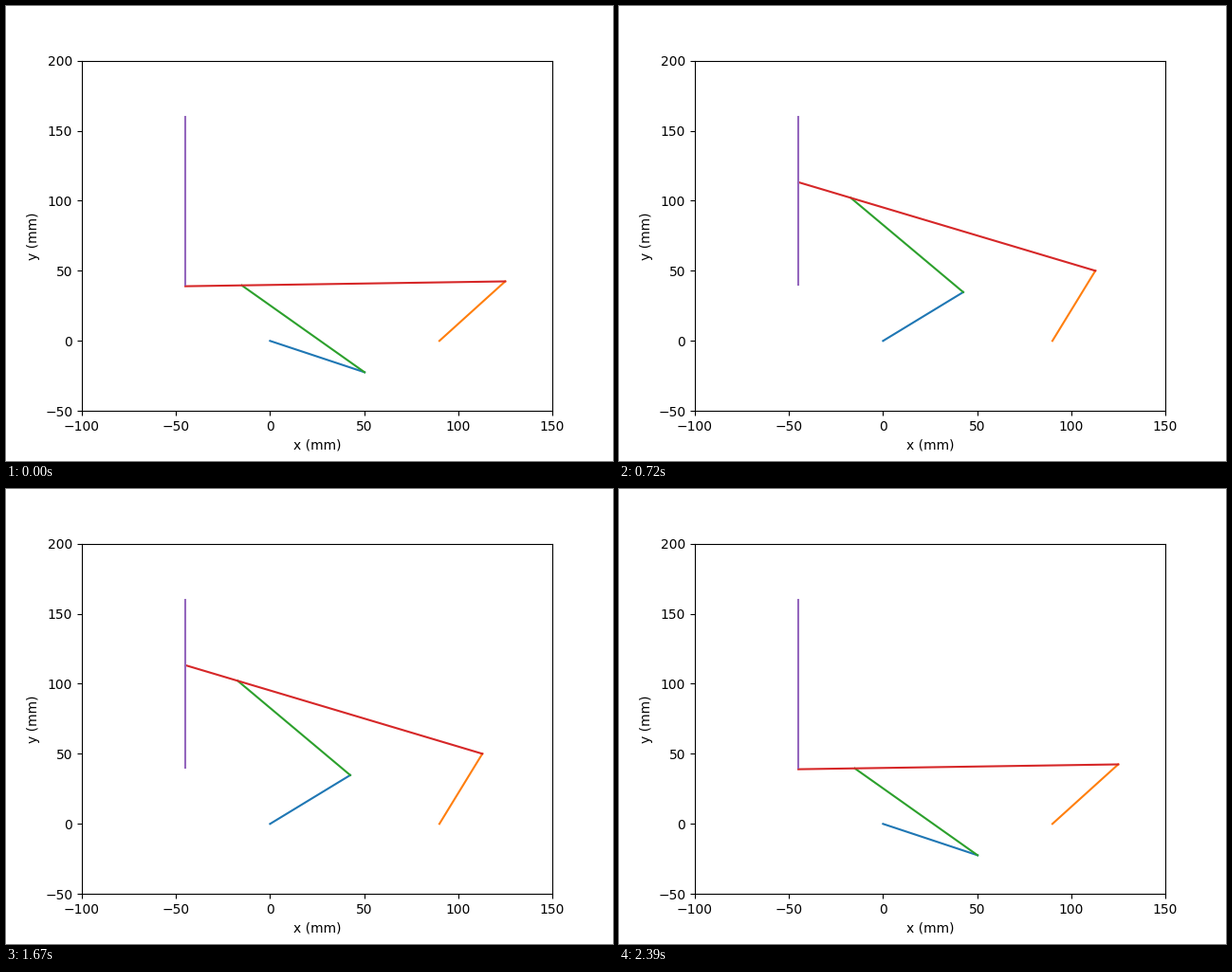
A matplotlib script that plays this animation: 640x480 px, repeating every 2410 ms.

```python
import numpy as np
import matplotlib.pyplot as plt
from matplotlib.animation import FuncAnimation

CRANK = 55       # both driven arms, mm
COUPLER = 90
BEAM = 170
JOINT = 30       # coupler joint, measured from the beam's tip
LEFT, RIGHT = np.array([0.0, 0.0]), np.array([90.0, 0.0])
TRACK_X = -45
STEPS = 60
TICKS = 241      # 10 ms each

heights = np.linspace(40, 160, STEPS)
heights[0] = 39  # the stroke starts slightly below the track


def elbow(p, q, rp, rq, side):
    """Point at distance rp from p and rq from q, on the chosen side of pq."""
    d = np.hypot(*(q - p))
    u = (q - p) / d
    a = (rp**2 - rq**2 + d**2) / (2 * d)
    h = np.sqrt(rp**2 - a**2)
    return p + a * u + side * h * np.array([-u[1], u[0]])


def pose(height):
    tip = np.array([TRACK_X, height])
    right = elbow(tip, RIGHT, BEAM, CRANK, 1)
    joint = tip + (right - tip) * JOINT / BEAM
    left = elbow(LEFT, joint, CRANK, COUPLER, -1)
    return (LEFT, left), (RIGHT, right), (left, joint), (tip, right)


fig, ax = plt.subplots(figsize=(6.4, 4.8), dpi=100)
ax.set(xlim=(-100, 150), ylim=(-50, 200), xlabel="x (mm)", ylabel="y (mm)")
bars = [ax.plot([], [], color=f"C{i}")[0] for i in range(4)]
ax.plot([TRACK_X, TRACK_X], [40, 160], color="C4")


def update(tick):
    # up and back down, 20 ms per step, with a short rest at the top
    step = min(min(tick, TICKS - 1 - tick) // 2, STEPS - 1)
    for bar, ends in zip(bars, pose(heights[step])):
        bar.set_data(*np.transpose(ends))
    return bars


anim = FuncAnimation(fig, update, frames=TICKS, interval=10,
                     init_func=lambda: update(0), repeat=True, repeat_delay=0)
plt.show()
```
